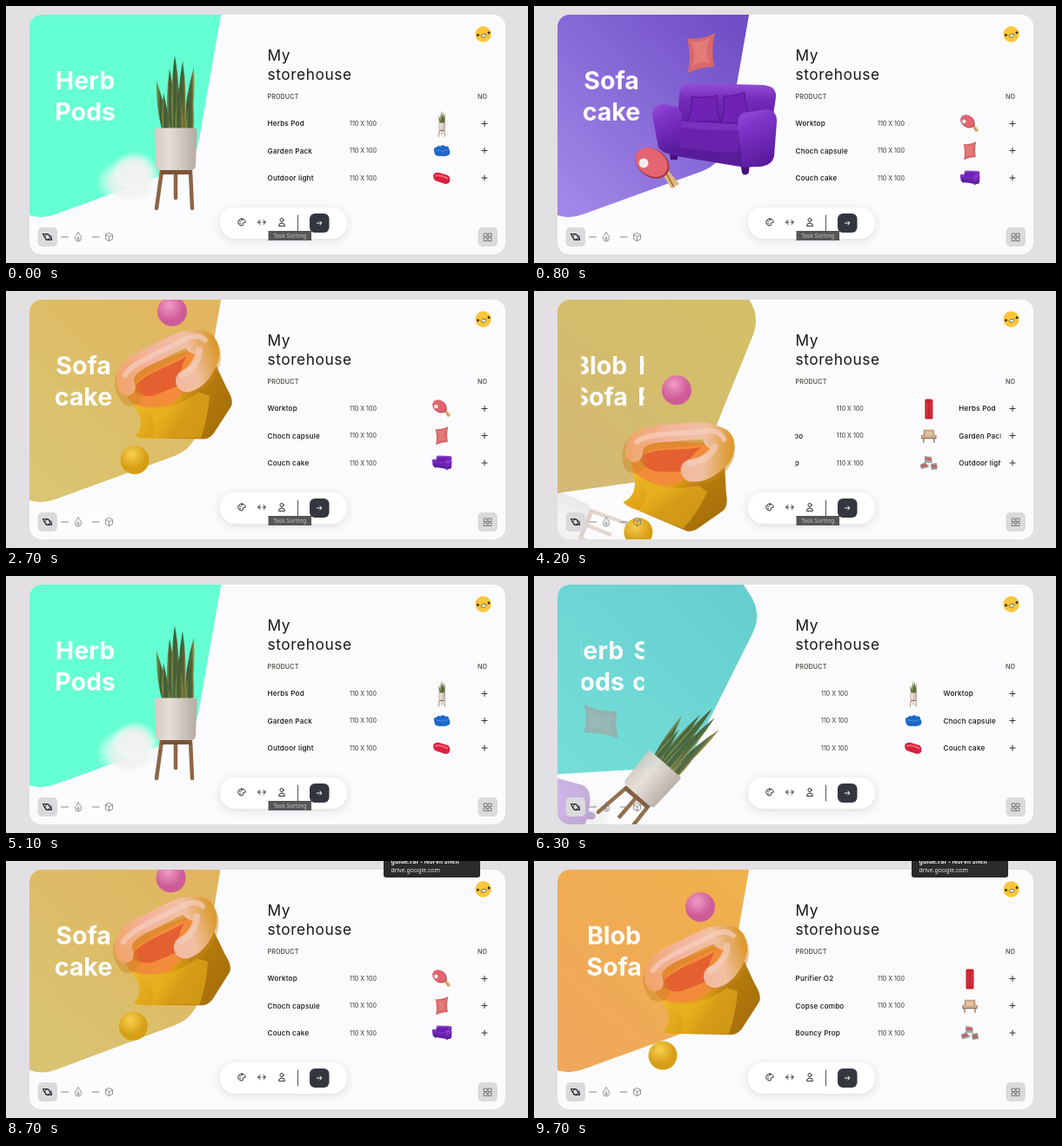
These frames come from a looping animation (600 px wide and 296 px high, 9800 ms). An HTML page:

```html
<!DOCTYPE html>
<html lang="en">
<head>
<meta charset="utf-8">
<title>My storehouse</title>
<style>
html, body { margin: 0; width: 100%; height: 100%; overflow: hidden; background: #e2e0e2; }
svg { display: block; width: 100vw; height: 100vh; font-family: Inter, sans-serif; }
.top { font-size: 17.3px; letter-spacing: .6px; fill: #17181b; }
.head { font-size: 28.5px; font-weight: 700; fill: #fff; text-anchor: middle; }
.name { font-size: 8.1px; letter-spacing: .2px; font-weight: 500; fill: #111; }
.size { font-size: 7.1px; fill: #333; }
.cap { font-size: 7.2px; letter-spacing: .1px; font-weight: 500; fill: #4a4038; }
.icon { fill: none; stroke: #2c2e33; stroke-width: 1; stroke-linecap: round; stroke-linejoin: round; }
.tip { font-family: "Noto Sans", sans-serif; fill: #eee; }
</style>
</head>
<body>
<svg viewBox="0 0 600 296">
<defs>
  <linearGradient id="bg" gradientUnits="userSpaceOnUse" x1="40" y1="225" x2="235" y2="25"><stop id="s0"/><stop id="s1" offset="1"/></linearGradient>
  <linearGradient id="pot"><stop stop-color="#d3cac1"/><stop offset=".35" stop-color="#e6dfd7"/><stop offset="1" stop-color="#b5aba1"/></linearGradient>
  <linearGradient id="leaf"><stop stop-color="#87914b"/><stop offset=".35" stop-color="#3f5a33"/><stop offset=".75" stop-color="#52683a"/><stop offset="1" stop-color="#b59445"/></linearGradient>
  <linearGradient id="back" x2="0" y2="1"><stop stop-color="#9350d6"/><stop offset=".3" stop-color="#7429b8"/><stop offset="1" stop-color="#551894"/></linearGradient>
  <linearGradient id="arm" x2=".3" y2="1"><stop stop-color="#994fdc"/><stop offset=".35" stop-color="#7f33c7"/><stop offset="1" stop-color="#5c1c9f"/></linearGradient>
  <linearGradient id="base" x2="1" y2=".5"><stop stop-color="#c98a12"/><stop offset=".2" stop-color="#f0bd2c"/><stop offset=".55" stop-color="#dfa116"/><stop offset=".7" stop-color="#b67b0c"/><stop offset="1" stop-color="#a8710a"/></linearGradient>
  <linearGradient id="tube" gradientUnits="userSpaceOnUse" x1="130" y1="145" x2="245" y2="110"><stop stop-color="#f0a468"/><stop offset=".4" stop-color="#f3b49c"/><stop offset=".75" stop-color="#f0c0a2"/><stop offset="1" stop-color="#dc9a30"/></linearGradient>
  <radialGradient id="pink" cx=".4" cy=".3"><stop stop-color="#f09bc4"/><stop offset="1" stop-color="#ce5c98"/></radialGradient>
  <radialGradient id="gold" cx=".4" cy=".3"><stop stop-color="#f6d04e"/><stop offset="1" stop-color="#d79f16"/></radialGradient>
  <radialGradient id="fog"><stop stop-color="#f2f2f2"/><stop offset=".55" stop-color="#f0f1f1" stop-opacity=".85"/><stop offset="1" stop-color="#fff" stop-opacity="0"/></radialGradient>
  <filter id="soft" x="-20%" y="-50%" width="140%" height="220%"><feDropShadow dx="0" dy="2" stdDeviation="5" flood-color="#445" flood-opacity=".18"/></filter>
  <clipPath id="cCard"><rect x="27" y="10" width="547" height="276" rx="14"/></clipPath>
  <clipPath id="cHead"><rect x="54.5" y="66" width="72" height="80"/></clipPath>
  <clipPath id="cRows"><rect x="300.5" y="116" width="236" height="100"/></clipPath>

  <g id="fogArt"><ellipse cx="142" cy="203" rx="39" ry="29" fill="url(#fog)"/><ellipse cx="148" cy="190" rx="27" ry="23" fill="url(#fog)"/></g>
  <g id="plantArt">
    <path d="M179 190L173 233M195 192V221M212 190L214 233" stroke="#8d6543" stroke-width="4.5" stroke-linecap="round"/>
    <path d="M178 187H213V194H178Z" fill="#795438"/>
    <g id="leaves" fill="url(#leaf)"/>
    <path d="M170.500 143Q170.500 140.500 173 140.500H217Q219.500 140.500 219.500 143L218 184Q218 189 212 189H178Q172.500 189 172 184Z" fill="url(#pot)"/>
  </g>
  <g id="sofaArt">
    <path d="M155 180H165V194H157ZM237 196H248L247 209Q242 214 239 209ZM262 188H270L268 200H263Z" fill="#461278"/>
    <path d="M167 119Q168 106 182 106L263 108Q279 109 278 122L271 170L164 165Z" fill="url(#back)"/>
    <path d="M160 165L243 170V203L158 189Z" fill="#5a1b9b"/>
    <path d="M181 121Q195 124 211 120Q209 135 214 150Q196 149 176 151Q182 138 181 121ZM218 121Q232 121 242 116Q242 133 250 150Q233 150 215 153Q220 138 218 121Z" fill="#7022b5" stroke="#531490" stroke-width="1"/>
    <path d="M159 157Q160 150 171 150L229 153Q238 154 237 164L236 181Q233 187 222 186L165 180Q158 179 158 172Z" fill="#6922ab"/>
    <path d="M160 155Q161 150 171 150L229 153Q237 154 237 160Q196 162 160 155Z" fill="#7b31c0"/>
    <path d="M136 142Q137 130 150 130L163 133Q171 136 170 149L166 188Q150 189 143 180Z" fill="url(#arm)"/>
    <path d="M234 152Q235 139 248 139L268 136Q280 138 279 151L276 190Q274 200 260 202L240 203Z" fill="url(#arm)"/>
  </g>
  <g id="pillowArt">
    <path d="M176 54Q192 57 208 48Q203 67 207 87Q192 87 177 94Q181 73 176 54Z" fill="#d96868"/>
    <path d="M180 58Q192 60 203 53Q195 68 202 83Q190 79 181 88Q188 72 180 58Z" fill="#e88480" opacity=".65"/>
  </g>
  <g id="batArt">
    <path d="M145 207L151 202L167 222L158 227Z" fill="#dfb781"/><path d="M152 210L161 226" stroke="#9c6d3c" stroke-width="1.500"/>
    <ellipse cx="136" cy="198" rx="21" ry="16" transform="rotate(35 136 198)" fill="#a73645"/>
    <ellipse cx="135" cy="197" rx="20" ry="15" transform="rotate(35 135 197)" fill="#e26570"/>
    <circle cx="126" cy="198" r="5.500" fill="#f5eeee"/>
  </g>
  <g id="blobArt">
    <path d="M143 158Q154 168 155 181Q154 193 148 196Q152 200 166 199L228 200Q236 199 241 190L259 162Q262 155 254 142L240 112L185 120Z" fill="url(#base)"/>
    <path d="M160 164Q190 168 222 146L234 150Q232 176 224 199H168Q176 180 160 164Z" fill="#efb722" opacity=".55"/>
    <path d="M136 142C140 112 185 112 222 92L224 128L190 160Q160 168 143 157Z" fill="#f28c3a"/>
    <path d="M146 143C156 124 190 117 208 104Q196 124 205 136L170 150Q156 152 146 143Z" fill="#e2552e" opacity=".8"/>
    <path d="M141 146C125 124 150 112 172 101C196 88 216 77 229 91C238 104 226 127 208 134" fill="none" stroke="#c98622" stroke-width="26" stroke-linecap="round" opacity=".45" transform="translate(2 3)"/>
    <path d="M139 140C130 122 150 110 172 101C196 88 216 77 229 91" fill="none" stroke="url(#tube)" stroke-width="20" stroke-linecap="round"/>
    <path d="M218 89C229 82 236 98 230 110C225 121 218 130 208 133" fill="none" stroke="url(#tube)" stroke-width="26" stroke-linecap="round"/>
    <path d="M137 126C146 111 180 99 208 84Q220 78 229 86" fill="none" stroke="#f8d2c6" stroke-width="6" stroke-linecap="round" opacity=".65"/>
    <path d="M222 98Q220 115 203 126" fill="none" stroke="#f6d0c0" stroke-width="8" stroke-linecap="round" opacity=".6"/>
  </g>
  <g id="pinkArt"><circle cx="191" cy="53" r="17" fill="url(#pink)"/></g>
  <g id="goldArt"><circle cx="148" cy="224" r="16.500" fill="url(#gold)"/></g>

  <g id="poufArt"><path d="M-9 0Q-10-4-6-4Q-5-7-2-5Q1-8 4-5Q8-6 8-2Q10 0 9 4Q5 7 0 6Q-6 7-8 4Z" fill="#1d67c8"/><path d="M-7-1Q0 2 7-1" stroke="#4a90e6" fill="none"/></g>
  <g id="lampArt"><path d="M-10-3Q-8-7-3-6L7-3Q10-1 9 4Q8 7 4 7L-5 4Q-10 3-10-3Z" fill="#d8203f"/><path d="M-8-2Q-2-4 7 1" stroke="#f2667c" stroke-width="2" fill="none"/></g>
  <g id="tinArt"><rect x="-4.500" y="-11" width="9" height="23" rx="1.500" fill="#c8202f"/><path d="M-2-8V9M2-8V9" stroke="#de4450"/></g>
  <g id="chairArt"><path d="M-6-7H6L7 2H-7Z" fill="#c9a27c"/><path d="M-4-5H4V0H-4Z" fill="#e2c7a5"/><path d="M-8-1V3H8V-1M-6 3V8M6 3V8" fill="none" stroke="#9a6b48" stroke-width="1.300"/></g>
  <g id="propArt"><path d="M-5-8L3-7L4 0L-5 0Z" fill="#a5a3a5"/><path d="M-10 2L-2-2L0 5L-9 7ZM2 1L9 0L10 7L3 8Z" fill="#8f9599"/><path d="M-4-5L3-4M-9 4L-2 2M3 4L9 4" stroke="#cf5a50" stroke-width="2.500"/><path d="M-3 0L2 4" stroke="#eee" stroke-width="2"/></g>
</defs>

<rect width="600" height="296" fill="#e2e0e2"/>
<rect x="27" y="10" width="547" height="276" rx="14" fill="#fbfbfd"/>
<g clip-path="url(#cCard)">
  <path id="hex" fill="url(#bg)"/>
  <g clip-path="url(#cHead)" id="heads"></g>
  <rect x="60" y="255" width="70" height="22" rx="5" fill="#fff" opacity=".6"/>
  <g id="things"></g>
</g>

<g class="top"><text x="300.500" y="63">My</text><text x="300.500" y="84.500">storehouse</text></g>
<text class="cap" x="300.500" y="106.500">PRODUCT</text><text class="cap" x="542" y="106.500">NO</text>
<g clip-path="url(#cRows)" id="tables"></g>
<path class="icon" d="M547 135.500h6m-3-3v6M547 166.500h6m-3-3v6M547 198h6m-3-3v6"/>

<g id="face"><circle cx="548.500" cy="32.500" r="9.200" fill="#fcc63c"/><circle cx="542.500" cy="33.500" r="1.500" fill="#333"/><circle cx="555" cy="30.800" r="1.500" fill="#333"/><path d="M546 34Q549 31 552 33Q552 36.500 547 36Z" fill="#fff" stroke="#4a3a20" stroke-width=".7"/></g>

<rect x="246" y="232" width="146" height="36" rx="18" fill="#fff" filter="url(#soft)"/>
<g class="icon">
  <path d="M271 245a4 4 0 1 0 1 7.800q1-.8 0-2q0-1.500 2-1.300q2 0 1-2q-1-2.500-4-2.500Z"/><path d="M269 248h.1m1.900-1.300h.1m-2 4h.1" stroke-width="1.600"/>
  <path d="M292 246.500l-2.500 2.500 2.500 2.500M296 246.500l2.500 2.500-2.500 2.500M290 249h2.800m2.400 0h2.800"/>
  <circle cx="317" cy="246.500" r="2"/><path d="M313.500 253q0-3 3.500-3t3.500 3z"/>
  <path d="M335.500 241v18" stroke="#555"/>
</g>
<rect x="349" y="239" width="22.500" height="22" rx="6" fill="#34373d"/>
<path d="M357 250h6m-2.300-2.300l2.300 2.300-2.300 2.300" fill="none" stroke="#fff"/>

<rect x="36.500" y="255" width="22.500" height="22" rx="5" fill="#dad9dc"/><rect x="542.500" y="255" width="22.500" height="22" rx="5" fill="#dad9dc"/>
<g class="icon"><path d="M43 262.500h5.500l3.500 7h-5.500zM44 266l-1.500-3.500m9.500 2.500l.5 4.500"/><circle cx="47.800" cy="266" r="3"/>
  <path d="M63.500 266h8m27.500 0h8" stroke="#888"/>
  <g stroke="#777" stroke-width=".8"><path d="M83 261q4 4 3.500 6.500a3.500 3.500 0 0 1-7 0q0-2.500 3.500-6.500zM83 265v5m-1.500-2h3M118.500 261.500l4 2v5l-4 2.200-4-2.200v-5zM114.500 263.500l4 2 4-2m-4 2v5"/></g>
  <path d="M549.500 262h3.500v3.500h-3.500zm5 0h3.500v3.500h-3.500zm-5 5h3.500v3.500h-3.500zm5 0h3.500v3.500h-3.500z" stroke="#666" stroke-width=".8"/>
</g>

<g id="tipA" class="tip"><rect x="301.500" y="259" width="49.500" height="11" fill="#555658"/><text x="326.300" y="266.900" font-size="6.700" font-weight="500" fill="#c4c4c6" text-anchor="middle">Task Sorting</text></g>
<g id="tipB" class="tip"><path d="M434 0H545V16Q545 19 542 19H437Q434 19 434 16Z" fill="#2b2b2e"/><text x="442.500" y="3.200" font-size="7" font-weight="700">guide.rar - Norvil Shelf</text><text x="442.500" y="12.500" font-size="6.900">drive.google.com</text></g>
</svg>

<script>
const LOOP = 9800, STEP = 100, MOVE = 600;
const starts = [60, 2040, 4010, 6077, 8140];
const $ = id => document.getElementById(id);
const clamp = v => Math.max(0, Math.min(1, v));
const lerp = (a, b, p) => a + (b - a) * p;
const mix = (a, b, p) => a.map((v, i) => lerp(v, b[i], p));
const ease = x => x < .5 ? 2 * x * x : 1 - 2 * (1 - x) ** 2;

function add(parent, tag, attrs, text) {
  const el = document.createElementNS('http://www.w3.org/2000/svg', tag);
  for (const k in attrs) el.setAttribute(k, attrs[k]);
  if (text) el.textContent = text;
  return parent.appendChild(el);
}

// [base x, tip x, tip y]
for (const [b, x, y] of [[184, 173, 86], [208, 216, 70], [190, 188, 72], [202, 203, 63], [195, 194, 57], [185, 181, 100], [211, 213, 96], [199, 199, 92]])
  add($('leaves'), 'path', { d: `M${b - 4} 144Q${(b + x) / 2 - 6} ${y + 35} ${x} ${y}Q${(b + x) / 2 + 6} ${y + 35} ${b + 4} 144Z` });

// thing: art, centre x, y, leaving [dx, dy, turn], arriving [dx, dy, turn]
// row: name, art, scale, centre x, y
const slides = [
  { head: ['Herb', 'Pods'], mid: 91, bg: [[100, 255, 210], [100, 255, 210]],
    things: [['fog', 142, 200, [-300, 300, 0], [-150, 90, 0]], ['plant', 195, 165, [-217, 253, 148], [-200, 118, -85]]],
    rows: [['Herbs Pod', 'plant', .17, 195, 146], ['Garden Pack', 'pouf', 1, 0, 0], ['Outdoor light', 'lamp', 1, 0, 0]] },
  { head: ['Sofa', 'cake'], mid: 89, bg: [[160, 134, 232], [112, 78, 198]],
    things: [['pillow', 192, 71, [-140, 290, 90], [-159, 134, -110]], ['sofa', 207, 158, [-170, 300, 110], [-270, 200, -110]], ['bat', 138, 204, [-150, 260, 80], [-220, 160, -110]]],
    rows: [['Worktop', 'bat', .42, 142, 204], ['Choch capsule', 'pillow', .46, 192, 71], ['Couch cake', 'sofa', .16, 207, 158]] },
  { head: ['Blob', 'Sofa'], mid: 92, bg: [[240, 168, 92], [240, 176, 76]], warm: [[217, 197, 114], [226, 182, 94]],
    things: [['pink', 192, 53, [-135, 305, 0], [-160, 134, 0]], ['blob', 195, 140, [-140, 340, 110], [-240, 170, -90]], ['gold', 148, 224, [-140, 268, 0], [-190, 120, 0]]],
    rows: [['Purifier O2', 'tin', 1, 0, 0], ['Copse combo', 'chair', 1, 0, 0], ['Bouncy Prop', 'prop', 1, 0, 0]] }
];

for (const s of slides) {
  s.title = add($('heads'), 'g', { class: 'head' });
  s.head.forEach((w, i) => add(s.title, 'text', { x: s.mid, y: 96 + 35.5 * i }, w));
  s.table = add($('tables'), 'g', {});
  s.rows.forEach(([name, art, k, cx, cy], i) => {
    const y = 135.5 + 31.2 * i;
    add(s.table, 'text', { class: 'name', x: 300.5, y: y + 2.8 }, name);
    add(s.table, 'text', { class: 'size', x: 395, y: y + 2.6 }, '110 X 100');
    add(s.table, 'use', { href: `#${art}Art`, transform: `translate(501 ${y}) scale(${k}) translate(${-cx} ${-cy})` });
  });
  s.group = add($('things'), 'g', {});
  s.parts = s.things.map(([art, x, y, out, into]) => {
    const el = add(s.group, 'g', {});
    add(el, 'use', { href: `#${art}Art` });
    return { el, x, y, out, into };
  });
}

function hexagon(turn) {
  const pts = [...Array(6)].map((_, i) => {
    const a = (40 + turn + 60 * i) * Math.PI / 180;
    return [66 + 197 * Math.cos(a), 55 + 197 * Math.sin(a)];
  });
  const cut = 26 / 197;
  return pts.map((v, i) => {
    const a = mix(v, pts[(i + 5) % 6], cut), b = mix(v, pts[(i + 1) % 6], cut);
    return `${i ? 'L' : 'M'}${a}Q${v} ${b}`;
  }).join('') + 'Z';
}

const show = (el, on) => el.setAttribute('display', on ? 'inline' : 'none');

function place(s, key, amount, lift, alpha) {
  s.group.setAttribute('opacity', alpha);
  for (const q of s.parts) {
    const [dx, dy, r] = q[key].map(v => v * amount);
    q.el.setAttribute('transform', `translate(${dx} ${dy + lift}) rotate(${r} ${q.x} ${q.y})`);
  }
}

function slideText(s, pos, on) {
  show(s.title, on);
  show(s.table, on);
  s.title.setAttribute('transform', `translate(${79 * pos} 0)`);
  s.table.setAttribute('transform', `translate(${235 * pos} 0)`);
}

function draw(t) {
  const k = Math.max(0, starts.filter(v => v <= t).length - 1);
  const dt = Math.max(0, t - starts[k]);
  const p = ease(clamp(dt / MOVE));
  const from = slides[k % 3], to = slides[(k + 1) % 3];

  $('hex').setAttribute('d', hexagon(60 * p));
  const goal = to.warm ? to.warm.map((c, i) => mix(c, to.bg[i], clamp((dt - 660) / 240))) : to.bg;
  goal.forEach((c, i) => $('s' + i).setAttribute('stop-color', `rgb(${mix(from.bg[i], c, p).map(Math.round)})`));

  for (const s of slides) {
    show(s.group, s === from || s === to);
    slideText(s, 0, false);
  }
  // the warm slide swaps its text at once, after its furniture has come in
  const q = to.warm ? +(dt >= 800) : p;
  slideText(from, -q, q < 1);
  slideText(to, 1 - q, q > 0);

  const lift = -35 * Math.sin(Math.PI * clamp((dt - 250) / 650)) ** 2;
  place(from, 'out', p, 0, 1 - clamp((p - .25) / .4));
  place(to, 'into', 1 - p, lift, clamp(p * 1.2));

  $('face').setAttribute('transform', `rotate(${3 * Math.sin(t / 260)} 548.5 32.5)`);
  show($('tipA'), t < 5500);
  show($('tipB'), t >= 6900);
}

const t0 = performance.now();
function tick() {
  const t = (performance.now() - t0) % LOOP;
  draw(Math.floor(t / STEP) * STEP);
  requestAnimationFrame(tick);
}
draw(0);
requestAnimationFrame(tick);
</script>
</body>
</html>
```
